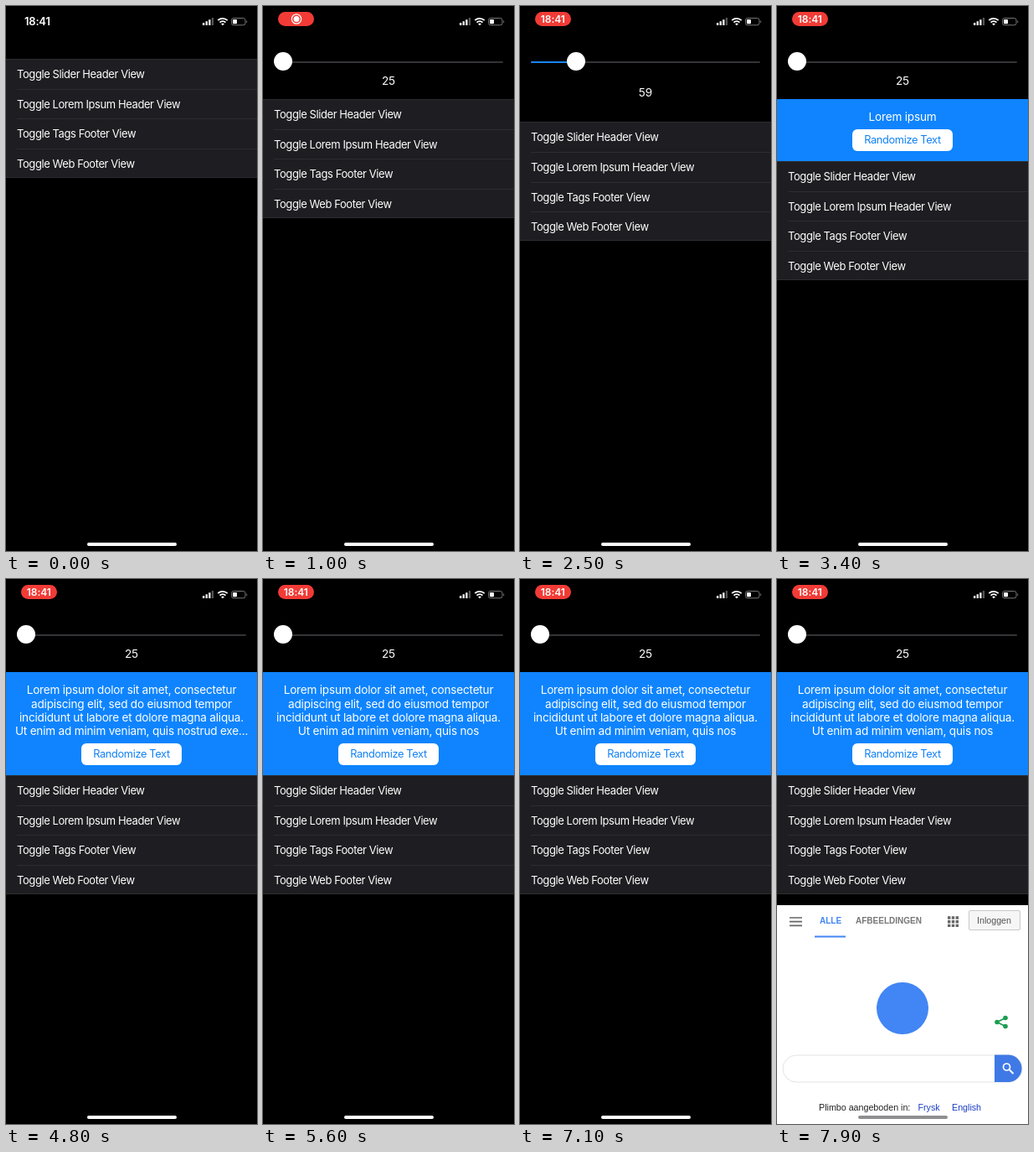
Animation, 300 px wide and 650 px high, one loop 8000 ms. Source, as an HTML page:

```html
<!DOCTYPE html>
<html lang="en">
<head>
<meta charset="utf-8">
<title>Toggle header and footer views</title>
<style>
html, body { margin: 0; width: 100%; height: 100%; overflow: hidden; background: #000; }
#stage { position: relative; width: 300px; height: 650px; overflow: hidden; background: #000; color: #fff; font: 13px Inter, sans-serif; }
#stage div, #stage svg { position: absolute; box-sizing: border-box; white-space: nowrap; }
#scroll { left: 0; top: 0; width: 300px; height: 650px; }
#slider { left: 0; top: 0; width: 300px; overflow: hidden; }
.track { left: 13px; top: 65.5px; height: 2.4px; border-radius: 2px; }
#thumb { top: 55px; width: 22px; height: 22px; border-radius: 50%; background: #fff; }
#value { left: 0; width: 300px; text-align: center; line-height: 20px; font-size: 13.6px; letter-spacing: -.1px; }
#lorem { left: 0; width: 300px; background: #0f84fe; overflow: hidden; }
#copy { left: 0; top: 13.3px; width: 300px; text-align: center; font-size: 13.6px; line-height: 16.33px; letter-spacing: -.21px; }
#button { left: 90px; width: 120px; height: 26px; border-radius: 6px; background: #fff; color: #1181f4; line-height: 26px; text-align: center; font-size: 12.8px; letter-spacing: -.35px; }
#list { left: 0; width: 300px; height: 142px; background: #1e1d21; border: solid #2d2c31; border-width: 1px 0; }
.row { left: 13px; width: 287px; height: 35.2px; line-height: 35px; letter-spacing: -.42px; }
.row + .row { border-top: 1px solid #2d2c31; }
#web { left: 0; width: 300px; height: 300px; background: #fff; color: #222; font: 10.7px "Liberation Sans", Arial, sans-serif; }
#web b, #web span { position: absolute; line-height: 14px; }
#page { left: 0; top: 0; width: 300px; height: 300px; }
#clock { left: 22px; top: 10px; font-weight: 600; line-height: 17px; letter-spacing: -.2px; }
#pill { left: 17.5px; top: 7px; width: 43.5px; height: 17px; border-radius: 9px; background: #f23b36; }
#pill div { width: 100%; text-align: center; font-weight: 600; font-size: 12px; line-height: 17px; letter-spacing: -.1px; }
#home { left: 96.5px; top: 639.5px; width: 107px; height: 4.5px; border-radius: 3px; }
</style>
</head>
<body>
<div id="stage">
  <div id="scroll">
    <div id="slider">
      <div class="track" style="width:274px;background:#343438"></div>
      <div class="track" id="fill" style="background:#1b84ef"></div>
      <div id="thumb"></div>
      <div id="value"></div>
    </div>
    <div id="lorem"><div id="copy"></div><div id="button">Randomize Text</div></div>
    <div id="list"></div>
    <div id="web"><div id="page">
      <svg width="300" height="262" fill="none">
        <path d="M15 15h15M15 19.7h15M15 24.4h15" stroke="#666" stroke-width="1.7"/>
        <path d="M45 37.5h37" stroke="#4285f4" stroke-width="2"/>
        <path d="M204 15h13M204 19.7h13M204 24.4h13" stroke="#666" stroke-width="3.4" stroke-dasharray="3.4 1.4"/>
        <rect x="229.5" y="6.5" width="61" height="23" rx="1.5" fill="#f6f6f6" stroke="#c8c8c8"/>
        <circle cx="150" cy="123" r="31" fill="#4285f4"/>
        <path d="M273 134.5l-10 5 10 5" stroke="#1c9d52" stroke-width="1.8"/>
        <g fill="#1c9d52"><circle cx="273" cy="134.5" r="2.8"/><circle cx="263" cy="139.5" r="2.8"/><circle cx="273" cy="144.5" r="2.8"/></g>
        <rect x="7" y="179" width="286" height="32" rx="16" stroke="#e3e3e3"/>
        <path d="M260 178.5h17.5a16.3 16.3 0 0 1 0 32.5h-17.5z" fill="#3f79e6"/>
        <circle cx="274.5" cy="193" r="4" stroke="#fff" stroke-width="1.7"/>
        <path d="M277.5 196l5 5" stroke="#fff" stroke-width="2"/>
      </svg>
      <b style="left:51px;top:12px;color:#4285f4;font-size:10px">ALLE</b>
      <b style="left:94px;top:12px;color:#777;font-size:10px">AFBEELDINGEN</b>
      <span style="left:239px;top:11px;color:#555">Inloggen</span>
      <span style="left:50px;top:234px">Plimbo aangeboden in:</span>
      <span style="left:168.5px;top:234px;color:#1a3fc4">Frysk</span>
      <span style="left:209px;top:234px;color:#1a3fc4">English</span>
    </div></div>
  </div>
  <div id="clock">18:41</div>
  <div id="pill">
    <div id="time">18:41</div>
    <svg id="rec" width="44" height="17"><circle cx="22" cy="8.5" r="5.7" fill="none" stroke="#fff" stroke-width="1.2"/><circle cx="22" cy="8.5" r="3.5" fill="#fff"/></svg>
  </div>
  <svg width="300" height="30" fill="#fff">
    <path d="M235 20h2.3v3H235zM238.6 18.3h2.3V23h-2.3zM242.2 16.3h2.3V23h-2.3z"/>
    <path d="M245.8 14h2.3v9h-2.3z" fill="#555"/>
    <g fill="none" stroke="#fff" stroke-width="1.8"><path d="M253.3 17.2a8.2 8.2 0 0 1 11.4 0M255.5 19.7a5 5 0 0 1 7 0"/></g>
    <path d="M259 23.3l-1.9-2a2.8 2.8 0 0 1 3.8 0z"/>
    <rect x="269.5" y="14.5" width="16.5" height="8.3" rx="2.4" fill="none" stroke="#777"/>
    <rect x="271" y="16" width="5" height="5.3" rx="1"/>
    <path d="M287.3 17.2a1.6 1.6 0 0 1 0 3z" fill="#777"/>
  </svg>
  <div id="home"></div>
</div>
<script>
const LOOP = 8000;
const $ = id => document.getElementById(id);
const px = (id, prop, v) => $(id).style[prop] = v + 'px';
const show = (id, on) => $(id).style.visibility = on ? 'visible' : 'hidden';
const ease = x => x * x * (3 - 2 * x);

// Eased value at t through alternating time, value pairs.
function track(t, ...k) {
  if (t <= k[0]) return k[1];
  for (let i = 2; i < k.length; i += 2)
    if (t < k[i]) return k[i - 1] + (k[i + 1] - k[i - 1]) * ease((t - k[i - 2]) / (k[i] - k[i - 2]));
  return k[k.length - 1];
}

['Slider Header', 'Lorem Ipsum Header', 'Tags Footer', 'Web Footer'].forEach((name, i) =>
  $('list').insertAdjacentHTML('beforeend', `<div class="row" style="top:${i * 35.2}px">Toggle ${name} View</div>`));

const long = 'Lorem ipsum dolor sit amet, consectetur<br>adipiscing elit, sed do eiusmod tempor<br>' +
  'incididunt ut labore et dolore magna aliqua.<br>Ut enim ad minim veniam, quis nos';
let copy;
function setCopy(html) {
  if (html !== copy) $('copy').innerHTML = copy = html;
}

function draw(t) {
  const value = Math.round(track(t, 1100, 25, 1800, 153, 2050, 175, 2700, 25));
  const open = track(t, 600, 0, 900, 1);
  const header = 63 + open * (28 + .8 * value);
  px('slider', 'height', header);
  show('slider', open > 0);
  const x = 23.7 + (value - 25) * 1.275;
  px('thumb', 'left', x - 11);
  px('fill', 'width', x - 13);
  $('value').textContent = value;
  px('value', 'top', 69 + .4 * value);

  const lines = track(t, 4100, 1, 4400, 4);
  const lorem = track(t, 3000, 0, 3300, 1) * (57.7 + 16.33 * lines);
  px('lorem', 'top', header);
  px('lorem', 'height', lorem);
  px('button', 'top', 19.3 + 16.33 * lines);
  setCopy(t < 4100 ? 'Lorem ipsum' : t < 5200 ? long + 'trud exe...' : long);

  px('list', 'top', header + lorem);
  px('web', 'top', header + lorem + 154.5);
  show('web', t >= 7400);
  show('page', t >= 7600);
  px('scroll', 'top', -track(t, 6300, 0, 6600, 75.5, 6700, 75.5, 7100, 0));

  const recording = t >= 400;
  show('clock', !recording);
  show('pill', recording);
  show('rec', recording && t < 2400);
  show('time', t >= 2400);
  $('home').style.background = t >= 7400 ? '#8f8f92' : '#fff';
}

const start = performance.now();
function tick(now) {
  draw(Math.max(0, now - start) % LOOP);
  requestAnimationFrame(tick);
}
draw(0);
requestAnimationFrame(tick);
</script>
</body>
</html>
```
